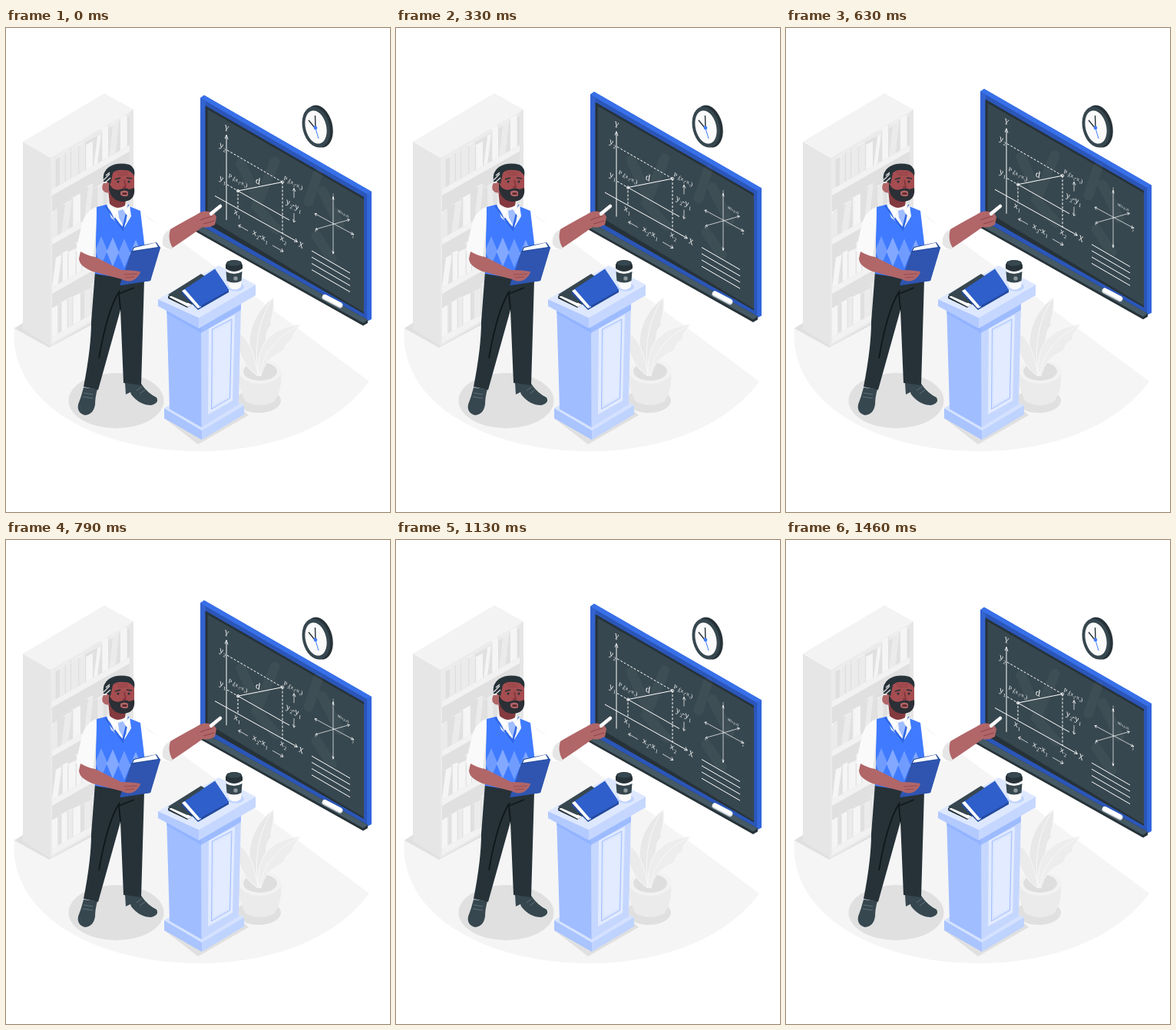
An HTML page for the animation above (1500 ms loop, 500 by 630 pixels).

```html
<!DOCTYPE html>
<html lang="en">
<head>
<meta charset="utf-8">
<title>Geometry lesson</title>
<style>
  html, body { margin: 0; width: 100%; height: 100%; overflow: hidden; background: #fff; }
  svg { display: block; width: 100%; height: 100%; }
  .ink { fill: none; stroke: #fff; stroke-width: 1; }
  .dash { stroke-dasharray: 3 2; }
  .thin { stroke-width: .7; }
  .tip { fill: none; stroke: #fff; stroke-width: .8; }
  text { fill: #fff; font: italic 11px "Liberation Serif", serif; text-anchor: middle; }
</style>
</head>
<body>
<svg viewBox="0 0 500 630">
  <!-- floor -->
  <path d="M11 390L22 384L166 236L177 240L473 460C432 517 348 551 252 551C130 551 22 500 11 412Q10 400 11 390Z" fill="#f5f5f5"/>

  <!-- bookshelf -->
  <path d="M11 391L22 384L58 408L166 348V357L56 416Z" fill="#e0e0e0"/>
  <path d="M22 148L58 169V414L22 392Z" fill="#e6e6e6"/>
  <path d="M22 148L128 85L166 106L58 169Z" fill="#f3f3f3"/>
  <path d="M58 169L166 106V352L58 414Z" fill="#ebebeb"/>
  <path d="M60 174L161 115V347L60 406Z" fill="#e0e0e0"/>
  <g id="shelf"></g>
  <path d="M161 110L166 106V352L161 355Z" fill="#e6e6e6"/>

  <!-- blackboard -->
  <g id="board">
    <path d="M253 91L258 87.5L476 213V379L470 382L253 258Z" fill="#3267dc"/>
    <path d="M253 91L470 216V382L253 258Z" fill="#2b56b8"/>
    <path d="M253 91L258 87.5L476 213L470 216Z" fill="#3870e8"/>
    <path d="M253 91L260 95V262L253 258Z" fill="#3363cf"/>
    <path d="M259.500 101L466 220V372L259.500 254Z" fill="#263238"/>
    <path d="M262.500 106L466 223V370L262.500 248Z" fill="#37474f"/>
    <g fill="none" stroke="#fff" stroke-opacity=".035" stroke-width="13" stroke-linecap="round">
      <path d="M306 176L328 224M350 174L326 232L352 262M406 190L394 226M412 212L434 256M404 270L424 300"/>
    </g>
    <path d="M247 262L255 258L471 380V384L465 387.500L247 265Z" fill="#263238"/>
    <path d="M247 262L255 258L471 380L465 384Z" fill="#455a64"/>
    <path d="M415 350.500L435 361" stroke="#d5d9dc" stroke-width="7" stroke-linecap="round"/>
    <path d="M415 349.500L435 360" stroke="#fff" stroke-width="5.500" stroke-linecap="round"/>

    <path class="ink" d="M287 140V250M272 218.500L379 278M302 212L360 200.500M302 212L369 250"/>
    <path class="ink dash" d="M288 159L360 200.500M288 204L302 212V236M360 200.500V268"/>
    <path class="tip" d="M285 144L287 139L289 145M375 278L379.500 278.500L377 274M373.500 212L375 208.500L377 213M373.500 249L375 253L377 251M306 256L302.500 257L305 260M357 291L361 291L359 287"/>
    <path class="ink thin" d="M375 209V221M375 241V252.500M303 257L315 264M347 283L361 291"/>
    <circle class="tip" cx="302" cy="212" r="1.700"/>
    <circle class="tip" cx="360" cy="200.500" r="1.700"/>
    <g id="labels"></g>

    <path class="ink thin" d="M426 220V294M402 241.500L453 269M403 262L447 249.500"/>
    <path class="tip" d="M425 223L426 219L427 224M425 290L426 294L427 291M405 241.500L402 241.500L404 245M450 265.500L453 269L449 268.500M444 248.500L447.500 249.500L445 252M405 260L403 262L406 263"/>
    <path class="ink" id="rules"/>
  </g>

  <!-- clock -->
  <g>
    <ellipse cx="407.500" cy="128" rx="17.500" ry="28" transform="rotate(-14 407.500 128)" fill="#263238"/>
    <ellipse cx="403.700" cy="129" rx="17.500" ry="27" transform="rotate(-14 403.700 129)" fill="#37474f"/>
    <ellipse cx="403.500" cy="129" rx="13.500" ry="22" transform="rotate(-14 403.500 129)" fill="#fafafa"/>
    <path d="M403 131L402.500 114M403 131L394 120" fill="none" stroke="#263238" stroke-width="1.400"/>
    <path d="M402 127L407 144" stroke="#407bff"/>
    <circle cx="403" cy="130" r="2.300" fill="#407bff"/>
  </g>

  <!-- plant -->
  <ellipse cx="329" cy="485" rx="29" ry="16" fill="#e0e0e0"/>
  <path d="M303 447H358Q360 472 349 486Q331 496 312 486Q302 470 303 447Z" fill="#ebebeb"/>
  <ellipse cx="331" cy="447" rx="27.500" ry="16" fill="#f2f2f2"/>
  <ellipse cx="331" cy="447" rx="22" ry="12" fill="#dedede"/>
  <g stroke="#f8f8f8" stroke-width="1">
    <path d="M326 452C314 424 308 382 348 351C350 375 342 381 346 386C335 397 342 402 331 452Z" fill="#e8e8e8"/>
    <path d="M329 452C325 410 345 390 383 386C374 399 372 401 374 404C363 412 362 416 363 419C345 428 336 435 332 453Z" fill="#ededed"/>
    <path d="M328 453C324 425 316 404 303 397C300 419 308 440 328 453Z" fill="#ebebeb"/>
    <path d="M328 450C323 410 330 379 347 352M330 452C336 423 350 403 382 387" fill="none"/>
  </g>

  <!-- lectern -->
  <path d="M206 508L250 542L316 504L300 490Z" fill="#e0e0e0"/>
  <path d="M206 495L255 523V536L206 508Z" fill="#a9c4ff"/>
  <path d="M255 523L310 491V503L255 536Z" fill="#bfd3ff"/>
  <path d="M206 495L255 465L310 491L255 524Z" fill="#d5e2ff"/>
  <path d="M209 358L255 388V520L213 496Z" fill="#a0bdff"/>
  <path d="M254 388L306 360L303 490L254.500 520Z" fill="#c6d7ff"/>
  <path d="M264 391L298 373L295 485L263 503Z" fill="#e2ebff"/>
  <path d="M268.500 392L294 379L291.500 482L267.500 496Z" fill="#d9e5ff" stroke="#a0bdff"/>
  <path d="M271 394L292 383L290 480L270 491Z" fill="#e2ebff"/>
  <path d="M209 362L252 386L306 358V367L254 397L209 371Z" fill="#8cafff" opacity=".7"/>
  <path d="M198 353L251 377V391L198 362Z" fill="#b3caff"/>
  <path d="M251 377L325 334V348L251 391Z" fill="#c6d7ff"/>
  <path d="M198 353L277 309L325 334L251 377Z" fill="#dde8ff"/>

  <!-- books and cup -->
  <path d="M211 349L254 321L276 337L236 364L211 352Z" fill="#263238"/>
  <path d="M212 350L217 348L242 360L237 363Z" fill="#fff"/>
  <path d="M211 347L254 320L276 334L236 358Z" fill="#37474f"/>
  <path d="M229 342L272 314L290 341V344L250 367L229 346Z" fill="#234a9d"/>
  <path d="M230 343L235 341L254 363L250 365Z" fill="#fff"/>
  <path d="M231 341L272 313.500L290.500 341L251 363Z" fill="#2f5fcb"/>
  <path d="M229 342L233 340L252 362L249 364Z" fill="#fff"/>
  <ellipse cx="299" cy="337" rx="11" ry="5.500" fill="#c0d4ff"/>
  <path d="M287 311H307.500L306 337Q298 344 290 337Z" fill="#fafafa"/>
  <path d="M286.500 317Q297 323 307.500 317L306.500 329Q297 334 287.500 329Z" fill="#37474f"/>
  <circle cx="299" cy="326" r="2.700" fill="#8c979d"/>
  <path d="M286 308L288 304Q297 300 306 304L308 309V313Q297 321 286 313Z" fill="#263238"/>
  <ellipse cx="297" cy="306" rx="9" ry="3.800" fill="#37474f"/>

  <!-- teacher -->
  <ellipse cx="143.500" cy="485" rx="62" ry="36" fill="#e0e0e0"/>
  <path d="M101 468L119 470Q116 481 116 490Q114 503 103 504Q92 501 94 490Q98 480 101 468Z" fill="#37474f"/>
  <path d="M155 462L176 463Q184 475 196 481Q200 488 189 491Q174 491 163 477L162 474L156 477Z" fill="#37474f"/>
  <path d="M101 475L113 477M100 480L113 482M170 472L177 467M174 476L181 471" stroke="#607078" fill="none"/>
  <path d="M116 317L180 327L176 465L153 462L149 367L120 471L101 467Q111 416 111 382Z" fill="#263238"/>
  <path d="M148 342Q132 366 121 430M149 366L147 346L167 338" fill="none" stroke="#0f171a" stroke-width="1.800"/>

  <path d="M158 231Q177 235 184 248L207 260L216 288Q195 289 180 279Z" fill="#fff"/>
  <path d="M214 262Q202 268 204 282Q208 288 217 288Z" fill="#e6e6e6"/>
  <path d="M214 262Q231 252 248 243Q256 237 264 239L271 241L274 246L272 256Q264 261 256 259Q238 272 217 286Q210 275 214 262Z" fill="#b16668"/>
  <path d="M253 250Q260 247 269 245M257 255L271 251" fill="none" stroke="#8c4347" stroke-width="1"/>
  <path d="M267 242L279 232" stroke="#e6e6e6" stroke-width="4.500" stroke-linecap="round"/>
  <path d="M267 241L279 231.500" stroke="#fff" stroke-width="3.500" stroke-linecap="round"/>

  <path d="M118 233L134 229L158 231L175 238L180 280V330L116 320Z" fill="#407bff"/>
  <g id="argyle" fill="#fff"></g>
  <path d="M131 229Q144 221 161 231L163 245L154 260L137 247Z" fill="#fafafa"/>
  <path d="M146 238L152 236L156 241L157 252L153 258L147 247Z" fill="#a0bdff"/>
  <path d="M129 231L152 262L160 230" fill="none" stroke="#2f66e5" stroke-width="2.500"/>
  <path d="M132 229L146 238L141 248ZM161 230L154 239L161 248Z" fill="#fff" stroke="#e0e0e0" stroke-width=".5"/>
  <path d="M118 233Q104 237 99 255L91 290Q100 299 116 302Z" fill="#fafafa"/>
  <path d="M117 262L113 301L117 302Z" fill="#e6e6e6"/>

  <path d="M163 291L166 285L196 279L201 286L188 329L150 335Z" fill="#234a9d"/>
  <path d="M165 290L167 286L195 279.500L198 285Z" fill="#fff"/>
  <path d="M163 292L201 285L188 329L148 335Z" fill="#2f55b0"/>
  <path d="M97 291Q108 297 116 298L150 315Q165 315 175 317Q175 321 168 327Q160 332 151 327L113 317Q95 310 95 300Z" fill="#b16668"/>
  <path d="M153 321L171 320M155 325L167 324" stroke="#954d50" fill="none"/>

  <path d="M133 210L135 229Q145 238 155 231L157 217Z" fill="#843a3e"/>
  <path d="M130 191Q130 181 145 180Q165 178 167 193L167 214Q164 222 154 222Q138 223 133 211Z" fill="#a54d50"/>
  <path d="M127 202Q124 206 126 211Q130 216 135 214L135 202Z" fill="#b16668"/>
  <path d="M127 200Q125 187 134 181Q145 174 161 178Q169 182 167 193Q163 184 153 185Q143 184 139 189L136 203L131 200Z" fill="#263238"/>
  <path d="M127 198L135 190M129 201L136 195M130 192L135 188" stroke="#e0e0e0" stroke-width="1.300"/>
  <path d="M134 202L138 208Q143 212 149 210Q155 207 161 210L167 208Q169 224 154 226Q139 227 134 211Z" fill="#2c2f35"/>
  <path d="M149 213Q154 210 159 213V218Q154 221 149 217Z" fill="#b16668"/>
  <path d="M151 215Q154 213 158 215L157 217H152Z" fill="#632c30"/>
  <path d="M154 198L156 207L152 207" fill="none" stroke="#7d3237" stroke-width="1.400"/>
  <path d="M142 197L149 195M157 195L164 196" stroke="#263238" stroke-width="1.600"/>
  <path d="M143 188L159 188M145 191L158 191" stroke="#813a3d" stroke-width=".6"/>
  <circle cx="146" cy="200" r="1.500" fill="#263238"/>
  <circle cx="160" cy="200" r="1.500" fill="#263238"/>
</svg>
<script>
const $ = id => document.getElementById(id);
const poly = (pts, fill) => `<path d="M${pts.map(p => p.map(n => n.toFixed(1))).join('L')}Z" fill="${fill}"/>`;

// bookshelf: rows of upright and leaning books along the wall
let seed = 11;
const rand = () => (seed = (seed * 16807) % 2147483647) / 2147483647;
function books() {
  const slope = .57;
  let out = '';
  for (let row = 0; row < 4; row++) {
    const base = 210 + row * 64;
    const at = (u, h) => [60 + u, base - slope * u - h];
    let u = 0;
    while (u < 92) {
      const w = 6 + rand() * 5, h = 32 + rand() * 10, lean = rand() > .78 ? 5 : 0;
      out += poly([at(u, 0), at(u + w, 0), at(u + w + lean, h), at(u + lean, h)], rand() > .5 ? '#f5f5f5' : '#ebebeb');
      out += poly([at(u + lean, h), at(u + w + lean, h), at(u + w + lean - 6, h + .5), at(u + lean - 6, h + .5)]
        .map(([x, y]) => [Math.max(60, x), y]), '#fff');
      out += poly([at(u + w - 1.2, 0), at(u + w, 0), at(u + w + lean, h), at(u + w + lean - 1.2, h)], '#dedede');
      u += w + lean + (rand() > .8 ? 4 : 0);
    }
    out += poly([at(0, 0), at(101, 0), at(101, -8), at(0, -8)], '#f2f2f2');
  }
  return out;
}
$('shelf').innerHTML = books();

// diamonds of the vest
let vest = '';
for (let i = 0; i < 4; i++) {
  const x = 124 + i * 15, y = 290 + i * 1.6;
  vest += `<path d="M${x} ${y - 19}l8 19l-8 19l-8 -19Z" opacity="${i % 2 ? .35 : .25}"/>`;
}
$('argyle').innerHTML = vest;

// chalk labels, slanted along the wall; digits after "_" are lowered
function label(s, x, y, size) {
  const body = s.replace(/_(\d)/g, (m, n) =>
    `<tspan dy="${size * .25}" font-size="${size * .6}">${n}</tspan><tspan dy="${-size * .25}">\u200b</tspan>`);
  return `<text transform="matrix(.9 .5 0 1 ${x} ${y})" style="font-size:${size}px">${body}</text>`;
}
$('labels').innerHTML = [
  ['Y', 287, 134, 11], ['X', 384, 286, 11], ['y_2', 282, 157, 12], ['y_1', 282, 200, 12],
  ['x_1', 301, 244, 12], ['x_2', 361, 278, 12], ['d', 328, 203, 13],
  ['x_2-x_1', 331, 274, 12], ['y_2-y_1', 374.5, 234, 12],
  ['P_1(x_1-x_1)', 302, 201, 8], ['P_2(x_2-x_1)', 374, 204, 8],
  ['z', 426, 218, 5], ['x', 403, 265, 5], ['y', 452, 273, 5], ['M(x,y,z)', 439, 243, 5]
].map(a => label(...a)).join('');

$('rules').setAttribute('d', [0, 1, 2, 3].map(i => `M398 ${290 + i * 8.2}l50 29`).join(''));

// the board floats up 10 px and back at an even speed, 24 steps a second
const LOOP = 1500, STEPS = 36, RISE = 10;
function draw(ms) {
  const step = Math.floor((ms % LOOP) / LOOP * STEPS + .1) % STEPS;
  const p = (step + .5) / STEPS;
  const lift = RISE * (1 - Math.abs(1 - 2 * p));
  $('board').setAttribute('transform', `translate(0 ${(.28 - lift).toFixed(3)})`);
}
let start;
function tick(now) {
  start ??= now;
  draw(now - start);
  requestAnimationFrame(tick);
}
draw(0);
requestAnimationFrame(tick);
</script>
</body>
</html>
```
